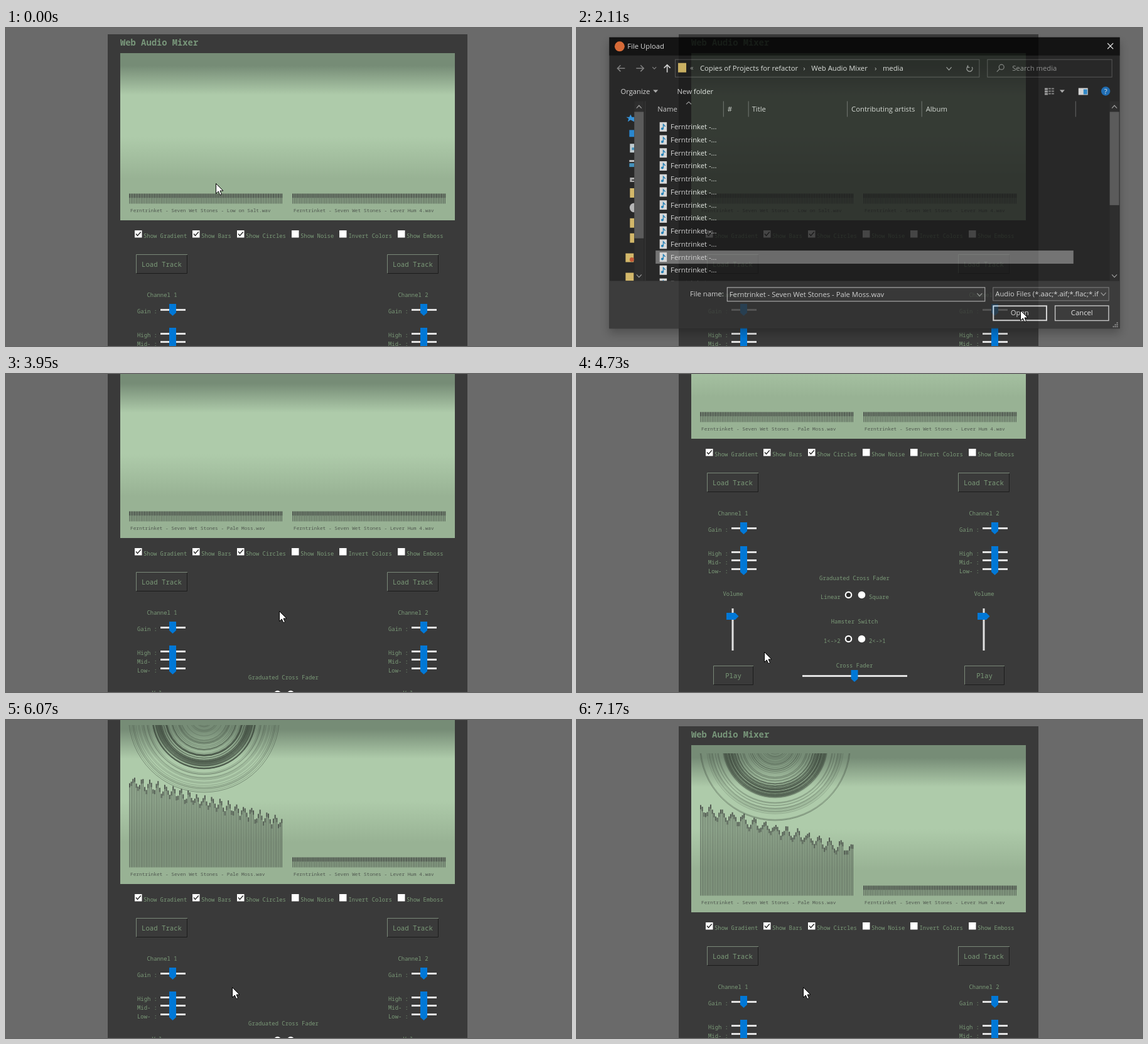
These frames come from a looping animation (900 by 506 pixels, 7200 ms). An HTML page with a canvas:

```html
<!DOCTYPE html>
<html lang="en">
<head>
<meta charset="utf-8">
<title>Web Audio Mixer</title>
<style>
html, body { margin: 0; width: 100%; height: 100%; overflow: hidden; background: #6a6a6a; }
canvas { display: block; }
</style>
</head>
<body>
<canvas id="stage" width="900" height="506"></canvas>
<script>
const LOOP = 7200, W = 900, H = 506;
const stage = document.getElementById('stage').getContext('2d');
const layer = document.createElement('canvas');
layer.width = W; layer.height = H;
const dialogCtx = layer.getContext('2d');
let g = stage;

const MONO = '"Noto Sans Mono", "DejaVu Sans Mono", monospace';
const SANS = '11.3px "Open Sans", "Noto Sans", sans-serif';
const GREEN = '#7b9a78', BLUE = '#0078d7', INK = '#505850', LIGHT = '#e2e2e2';
const ALBUM = 'Ferntrinket - Seven Wet Stones - ';
const OLD = 'Low on Salt.wav', NEW = 'Pale Moss.wav', OTHER = 'Lever Hum 4.wav';

const clamp = v => Math.min(1, Math.max(0, v));
const easeOut = u => 1 - (1 - clamp(u)) ** 2;
const rnd = n => { const v = Math.sin(n * 12.9898) * 43758.5453; return v - Math.floor(v); };

function box(x, y, w, h, color) { g.fillStyle = color; g.fillRect(x, y, w, h); }
function frame(x, y, w, h, color, line = 1) {
  g.strokeStyle = color; g.lineWidth = line;
  g.strokeRect(x + line / 2, y + line / 2, w - line, h - line);
}
function disc(x, y, r, color) {
  g.fillStyle = color; g.beginPath(); g.arc(x, y, r, 0, 7); g.fill();
}
function trace(pts) {
  g.beginPath();
  for (let i = 0; i < pts.length; i += 2) g.lineTo(pts[i], pts[i + 1]);
}
function poly(color, ...pts) { trace(pts); g.fillStyle = color; g.fill(); }
function line(color, width, ...pts) {
  trace(pts); g.strokeStyle = color; g.lineWidth = width; g.stroke();
}
function text(s, x, y, font, color, align = 'left') {
  g.font = font; g.fillStyle = color; g.textAlign = align; g.fillText(s, x, y);
}
const label = (s, x, y, align) => text(s, x, y, '8.89px ' + MONO, GREEN, align);

// --- mixer page ---
function button(s, x, y, w) {
  line('#7a8878', 1, x + .5, y + 30, x + .5, y + .5, x + w, y + .5);
  line('#1c1c1c', 1, x + 1, y + 30.5, x + w - .5, y + 30.5, x + w - .5, y + 1);
  text(s, x + w / 2, y + 20, '10.67px ' + MONO, GREEN, 'center');
}
function slider(x, y, w) {
  box(x, y - 1.5, w, 3, LIGHT);
  const m = x + w / 2 - .5;
  poly(BLUE, m - 5.5, y - 9.5, m + 5.5, y - 9.5, m + 5.5, y + 4.5, m, y + 9.5, m - 5.5, y + 4.5);
}
function checkbox(s, x, textX, on) {
  box(x, 322, 11.5, 11.5, '#fff');
  if (on) line('#222', 1.3, x + 2, 327.5, x + 4.5, 330.5, x + 9.7, 324.5);
  label(s, textX, 334);
}
function radios(y) {
  disc(432.5, y, 5.8, '#fff'); disc(432.5, y, 3.6, '#2c2c2c');
  disc(453.5, y, 5.8, '#fff');
}
function channel(n, x) {
  button('Load Track', x + 207, 360, 82);
  label('Channel ' + n, x + 248.5, 428, 'center');
  [['Gain :', 454, 448.5], ['High :', 492, 486.5], ['Mid- :', 506, 499.5], ['Low- :', 520, 513.5]]
    .forEach(([s, base, y]) => { label(s, x + 209, base); slider(x + 246, y, 40); });
  label('Volume', x + 248.5, 556, 'center');
  box(x + 246.5, 576, 3, 67, LIGHT);
  poly(BLUE, x + 238, 583, x + 252, 583, x + 257.5, 588.5, x + 252, 594, x + 238, 594);
  button('Play', x + 217, 667, 64);
}
function bars(x, height) {
  for (let i = 0; i < 92; i++) {
    const bx = x + i * 2.663, top = 279.5 - height(i);
    box(bx + .3, top + 7, 1.4, 272.5 - top, 'rgba(80,90,80,.8)');
    box(bx, top, 2, 7, INK);
  }
}
function rings(step, level) {
  g.save();
  g.beginPath(); g.rect(182, 53, 533, 253); g.clip();
  for (let i = 0; i < 92; i++) {
    const u = rnd(i * 7.3 + step * 1.7);
    let r = 60 + u * 23, alpha = .5;
    if (i > 75) { r = 83 + u * 36; alpha = .28; }
    else if (i > 50) { r = 14 + u * 48; alpha = .32; }
    if (!i) r = 120;
    g.strokeStyle = `rgba(66,78,66,${alpha})`;
    g.lineWidth = 1;
    g.beginPath(); g.arc(315.5, 40, r * level, 0, Math.PI); g.stroke();
  }
  g.restore();
}
function visuals(t) {
  const fade = g.createLinearGradient(0, 40, 0, 306);
  [[0, '#768c76'], [.075, '#768c76'], [.25, '#aecbaa'], [.5, '#aecbaa'], [.75, '#98b294'], [1, '#98b294']]
    .forEach(([at, c]) => fade.addColorStop(at, c));
  box(182, 40, 533, 266, fade);

  const level = clamp((t - 5130) / 200), step = Math.floor(t / 40);
  const since = (t - 6070) / 1100;
  const period = 12.5 + 4.8 * since, peak = 203 + 9 * since;
  const slope = 66 + 22 * Math.sin(Math.PI * 3 * since) ** 2;
  bars(196, i => {
    const wave = 7.5 * Math.cos(2 * Math.PI * (196 + i * 2.663 - peak) / period);
    const loud = 140 - slope * i / 91 + wave + (rnd(i + step * 3.1) - .5) * 6;
    return 16 + (loud - 16) * level;
  });
  bars(456, () => 16);
  if (level) rings(step, level);
  const small = '7.78px ' + MONO;
  text(ALBUM + (t < 2300 ? OLD : NEW), 198, 292.5, small, INK);
  text(ALBUM + OTHER, 458, 292.5, small, INK);
}
function page(t) {
  const scroll = Math.round(203 * (easeOut((t - 3917) / 290) - easeOut((t - 5830) / 455)));
  box(0, 0, W, H, '#6a6a6a');
  g.save();
  g.translate(0, -scroll);
  box(162, 10, 573, 800, '#3a3a3a');
  text('Web Audio Mixer', 182, 28, 'bold 13.8px ' + MONO, '#78967a');
  visuals(t);
  checkbox('Show Gradient', 205, 219, true);
  checkbox('Show Bars', 297, 311, true);
  checkbox('Show Circles', 368, 382, true);
  checkbox('Show Noise', 455, 469);
  checkbox('Invert Colors', 531, 545.5);
  checkbox('Show Emboss', 624, 638);
  channel(1, 0);
  channel(2, 400);
  label('Graduated Cross Fader', 442, 531, 'center');
  label('Linear', 388, 561); radios(554.5); label('Square', 465, 561);
  label('Hamster Switch', 442, 600, 'center');
  label('1<->2', 393, 631); radios(624.5); label('2<->1', 465, 631);
  label('Cross Fader', 442, 670, 'center');
  slider(359, 683.5, 167);
  g.restore();
}

// --- file dialog ---
const say = (s, x, y, color = '#f2f2f2', align) => text(s, x, y, SANS, color, align);
const chevron = (x, y, dy = 2.2, color = '#aaa', r = 4) => line(color, 1.2, x - r, y - dy, x, y + dy, x + r, y - dy);
const arrow = (x, y, dir, color) => {
  line(color, 1.5, x - 6, y, x + 6, y);
  line(color, 1.5, x + dir, y - 5, x + 6 * dir, y, x + dir, y + 5);
};
function fileRow(y, lit) {
  if (lit) box(124, y - 10.5, 668, 21, lit);
  box(130.5, y - 7.5, 11.5, 15, '#f3f3f3');
  disc(134.8, y + 3, 2, '#1787c9');
  line('#1787c9', 1.4, 136.3, y + 3, 136.3, y - 4, 139.5, y - .5);
  say('Ferntrinket -...', 148, y + 4);
}
function sideIcons() {
  poly('#2a9df4', 84, 137, 86, 141.5, 90, 141.5, 90, 149, 84, 146, 79.5, 149, 81, 144, 77, 141.5, 82, 141.5);
  box(82, 162, 8, 11, '#1b8fe8');
  box(83, 184, 7, 14, '#d5e2e8'); box(86, 190, 4, 4, '#3c9bd0');
  box(82, 210, 8, 3, '#ddd'); box(82, 215, 8, 6, '#3c9bd0');
  box(83, 238, 7, 7, '#bbb'); box(86, 241, 4, 2, '#333');
  [262, 310, 334].forEach(y => box(83, y - 7, 7, 15, '#eccb6b'));
  disc(90, 286, 7.5, '#c8c8c8');
  box(76, 359, 13, 14, '#eccb6b'); disc(86, 369, 3.5, '#d9552c');
  box(76, 390, 13, 13, '#eccb6b');
}
function dialogBody(t) {
  const picked = t > 1480;
  g.save();
  g.shadowColor = 'rgba(0,0,0,.3)'; g.shadowBlur = 14; g.shadowOffsetY = 8;
  box(50, 14, 816, 465, '#191919');
  g.restore();
  box(50, 14, 816, 29, '#000');
  disc(66.5, 28.5, 8, '#f06a2c');
  say('File Upload', 79, 32.5);
  line('#fff', 1.2, 846.5, 23.5, 855.5, 32.5);
  line('#fff', 1.2, 855.5, 23.5, 846.5, 32.5);

  arrow(69, 63.5, -1, '#888'); arrow(99, 63.5, 1, '#888'); chevron(122, 63, 1.5, '#888', 3);
  line('#eee', 1.6, 142.5, 70, 142.5, 58); line('#eee', 1.6, 137.5, 63, 142.5, 58, 147.5, 63);
  frame(155, 49, 487, 29, '#555'); frame(654, 49, 200, 29, '#555');
  box(160, 55, 13, 15, '#eccb6b');
  say('«', 179, 66, '#aaa');
  say('Copies of Projects for refactor', 195, 67.5);
  say('›', 360, 67, '#ccc'); say('Web Audio Mixer', 373, 67.5);
  say('›', 474, 67, '#ccc'); say('media', 487, 67.5);
  chevron(593, 64);
  g.strokeStyle = '#999'; g.lineWidth = 1.4;
  g.beginPath(); g.arc(626, 64, 4.5, -.6, 4.2); g.stroke();
  line('#999', 1.4, 623, 58.5, 623, 62, 626, 62);
  g.strokeStyle = '#888'; g.lineWidth = 1.2;
  g.beginPath(); g.arc(677, 61.5, 4, 0, 7); g.stroke();
  line('#888', 1.2, 674, 64.5, 669.5, 69);
  say('Search media', 694, 67.5, '#999');

  say('Organize', 68, 104); poly('#bbb', 120, 98, 128, 98, 124, 102.5);
  say('New folder', 158.5, 104);
  for (let i = 0; i < 3; i++) {
    box(746, 95 + i * 4, 5, 3, '#aaa'); box(752, 95 + i * 4, 4, 2, '#888'); box(757, 95 + i * 4, 4, 2, '#888');
  }
  poly('#bbb', 770, 98, 778, 98, 774, 102.5);
  box(800, 95, 15, 11, '#eee'); box(808, 97, 6, 8, '#2490dc');
  disc(843.5, 100, 7.2, '#0f6fc6');
  say('?', 843.5, 104, '#fff', 'center');

  g.save();
  g.beginPath(); g.rect(50, 115, 816, 288); g.clip();
  sideIcons();
  box(90, 116, 15, 287, '#202020'); box(90, 133, 15, 202, '#585858');
  box(850, 116, 15, 287, '#202020'); box(850, 133, 15, 149, '#585858');
  [97.5, 857.5].forEach(x => { chevron(x, 125, -2.2); chevron(x, 395); });
  box(107, 116, 1, 287, '#333');
  [[127, 'Name'], [239, '#'], [278, 'Title'], [437, 'Contributing artists'], [556, 'Album']]
    .forEach(([x, s]) => say(s, x, 132.5, '#ddd'));
  [232, 272, 430, 549, 795].forEach(x => box(x, 116, 1, 25, '#666'));
  chevron(177, 119, -1.8);
  for (let i = 0; i < 13; i++) fileRow(157 + i * 20.8, i === 10 && (picked ? '#777' : '#4d4d4d'));
  g.restore();

  box(50, 403, 816, 76, '#323232');
  say('File name:', 179, 428);
  box(238, 413, 412, 23, '#383838'); frame(238, 413, 413, 23, '#ddd');
  if (picked) say(ALBUM + NEW, 242, 428.5);
  else {
    box(241, 417, 84, 15, BLUE);
    g.save();
    g.beginPath(); g.rect(241, 414, 90, 21); g.clip();
    say(OLD, 324.5, 428.5, '#fff', 'right');
    g.restore();
    box(325, 417, 1, 15, '#e88a30');
  }
  chevron(642, 425);
  box(663, 413, 186, 22, '#383838'); frame(663, 413, 186, 22, '#888');
  say('Audio Files (*.aac;*.aif;*.flac;*.if', 667, 428);
  chevron(840, 424);
  frame(663, 442, 87, 25, '#eee', 2); say('Open', 706, 458, '#fff', 'center');
  frame(762, 442, 87, 25, '#ddd', 1.4); say('Cancel', 805.5, 458, '#fff', 'center');
  for (let i = 0; i < 3; i++)
    for (let j = 0; j <= i; j++) box(861 - j * 3, 469 + i * 3, 2, 2, '#999');
}
function dialog(t) {
  if (t < 1220 || t > 2240) return;
  const alpha = clamp((t - 1180) / 140) * (1 - clamp((t - 2080) / 160));
  const scale = 1.01 - .07 * (1 - alpha);
  g = dialogCtx;
  g.clearRect(0, 0, W, H);
  g.save();
  g.translate(458, 246.5); g.scale(scale, scale); g.translate(-458, -246.5);
  dialogBody(t);
  g.restore();
  g = stage;
  g.globalAlpha = alpha;
  g.drawImage(layer, 0, 0);
  g.globalAlpha = 1;
}

// --- pointer: time, x, y ---
const path = [
  [40, 334, 247], [730, 251, 376], [880, 251, 376], [920, 263, 371], [1500, 263, 371],
  [1940, 706, 450], [2620, 705, 447], [2710, 701, 445], [3410, 499, 378], [3880, 435, 377],
  [4250, 435, 377], [4730, 298, 442], [4850, 255, 469], [4970, 244, 480], [5250, 244, 480],
  [5760, 360, 425]
];
function pointer(t) {
  const n = path.findIndex(p => p[0] > t);
  const b = path[n < 0 ? path.length - 1 : n], a = n > 0 ? path[n - 1] : b;
  const u = a === b ? 0 : (t - a[0]) / (b[0] - a[0]);
  g.save();
  g.translate(Math.round(a[1] + (b[1] - a[1]) * u) + .5, Math.round(a[2] + (b[2] - a[2]) * u) + .5);
  trace([0, 0, 0, 16, 3.8, 12.5, 6.3, 18.2, 9, 17, 6.5, 11.5, 11.5, 11.5]);
  g.closePath();
  g.fillStyle = '#fff'; g.fill();
  g.strokeStyle = '#000'; g.lineWidth = 1; g.stroke();
  g.restore();
}

function draw() {
  const t = performance.now() % LOOP;
  page(t);
  dialog(t);
  pointer(t);
  requestAnimationFrame(draw);
}
draw();
</script>
</body>
</html>
```
